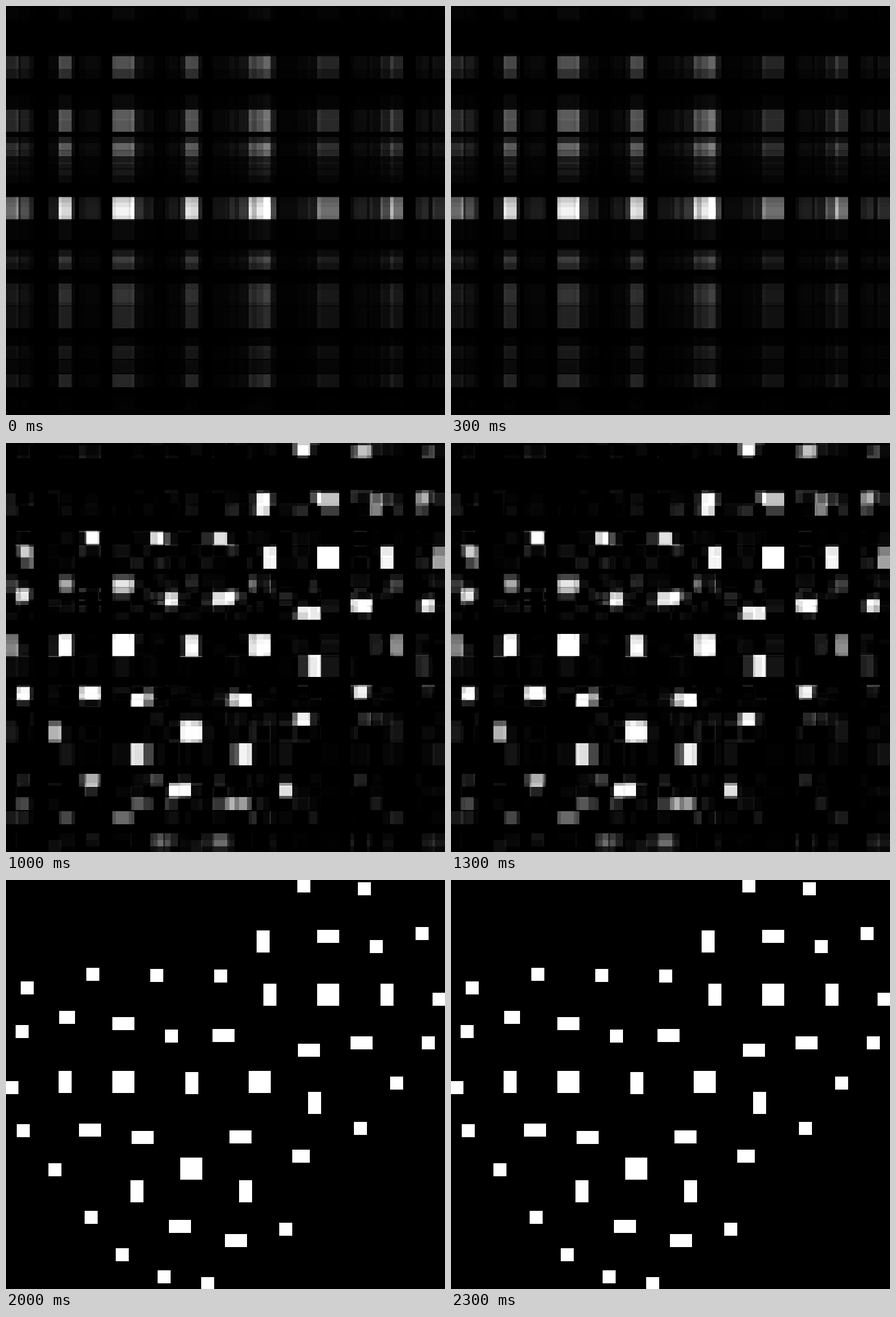
Write an HTML page with a canvas that moves like this. It is 776 px wide and 722 px high and loops after 2.5 s.

```html
<!DOCTYPE html>
<html lang="en">
<head>
<meta charset="utf-8">
<title>Low-rank approximation</title>
<style>
  html, body { margin: 0; width: 100%; height: 100%; overflow: hidden; background: #000; }
  canvas { display: block; }
</style>
</head>
<body>
<canvas id="stage" width="776" height="722"></canvas>
<script>
const W = 776, H = 722, STEP = 500;
const RANKS = [1, 5, 12, 22, Infinity];
const SHORT = 23, LONG = 39, REACH = 103.5;

const blocks = [];
const clamp = (v, max) => Math.min(max, Math.max(0, v));

function put(cx, cy, w, h) {
  const x = Math.round(cx - w / 2), y = Math.round(cy - h / 2);
  blocks.push({ x0: clamp(x, W), x1: clamp(x + w, W), y0: clamp(y, H), y1: clamp(y + h, H) });
}

// A large square with bars around it: upright beside it, flat above and below.
function hub(cx, cy, angles) {
  put(cx, cy, LONG, LONG);
  for (const deg of angles) {
    const a = deg * Math.PI / 180;
    const upright = Math.abs(Math.sin(a)) < 0.45;
    put(cx + REACH * Math.cos(a), cy + REACH * Math.sin(a),
      upright ? SHORT : LONG, upright ? LONG : SHORT);
  }
}

hub(207.5, 356.5, [180, -90, 125, 71]);
hub(448.5, 356.5, [-128, 21, -33]);
hub(327.5, 509.5, [157.5, 22.5, -33, 101]);
hub(569.5, 202.5, [180, 0, -90, 55]);
put(454.5, 108.5, SHORT, LONG);
put(328.5, 358.5, SHORT, LONG);
put(406.5, 636.5, LONG, SHORT);

// Centres of the small squares
[[526, 10], [633, 15], [735, 94], [654, 117], [153, 166], [266, 168], [379, 169], [37, 190],
  [765, 210], [105, 242], [110, 242], [28, 267], [292, 275], [746, 287], [10, 366], [690, 358],
  [30, 442], [626, 438], [86, 511], [517, 487], [525, 487], [150, 595], [494, 616], [205, 661],
  [279, 700], [356, 712]].forEach(([x, y]) => put(x + 0.5, y + 0.5, SHORT, SHORT));

const edges = list => [...new Set(list)].sort((a, b) => a - b);
const xs = edges([0, W, ...blocks.flatMap(b => [b.x0, b.x1])]);
const ys = edges([0, H, ...blocks.flatMap(b => [b.y0, b.y1])]);
const sizes = e => e.slice(1).map((v, i) => v - e[i]);
const cw = sizes(xs), rh = sizes(ys);

const dot = (a, b) => a.reduce((sum, v, i) => sum + v * b[i], 0);

function rotate(a, b, c, s) {
  for (let i = 0; i < a.length; i++) {
    const p = a[i], q = b[i];
    a[i] = c * p - s * q;
    b[i] = s * p + c * q;
  }
}

// One-sided Jacobi SVD; cells are weighted by the square root of their area.
function decompose() {
  const cols = cw.map((w, j) => rh.map((h, i) =>
    blocks.some(b => b.x0 <= xs[j] && xs[j] < b.x1 && b.y0 <= ys[i] && ys[i] < b.y1)
      ? Math.sqrt(w * h) : 0));
  const basis = cw.map((_, j) => cw.map((_, k) => +(j === k)));
  for (let sweep = 0, busy = true; busy && sweep < 30; sweep++) {
    busy = false;
    for (let p = 0; p < cols.length; p++) {
      for (let q = p + 1; q < cols.length; q++) {
        const g = dot(cols[p], cols[q]);
        if (Math.abs(g) < 1e-7) continue;
        busy = true;
        const z = (dot(cols[q], cols[q]) - dot(cols[p], cols[p])) / (2 * g);
        const t = (z < 0 ? -1 : 1) / (Math.abs(z) + Math.hypot(1, z));
        const c = 1 / Math.hypot(1, t);
        rotate(cols[p], cols[q], c, c * t);
        rotate(basis[p], basis[q], c, c * t);
      }
    }
  }
  return cols.map((u, k) => ({ u, v: basis[k], power: dot(u, u) }))
    .sort((a, b) => b.power - a.power);
}

const parts = decompose();
const ctx = document.getElementById("stage").getContext("2d");

function draw(rank) {
  const used = parts.slice(0, rank);
  ctx.fillStyle = "#000";
  ctx.fillRect(0, 0, W, H);
  rh.forEach((h, i) => cw.forEach((w, j) => {
    const sum = used.reduce((s, { u, v }) => s + u[i] * v[j], 0);
    const g = Math.round(clamp(sum / Math.sqrt(w * h), 1) * 255);
    if (!g) return;
    ctx.fillStyle = `rgb(${g},${g},${g})`;
    ctx.fillRect(xs[j], ys[i], w, h);
  }));
}

let shown = -1;
const start = performance.now();
function tick(now) {
  const step = Math.floor(Math.max(0, now - start) / STEP) % RANKS.length;
  if (step !== shown) draw(RANKS[shown = step]);
  requestAnimationFrame(tick);
}
tick(start);
</script>
</body>
</html>
```
